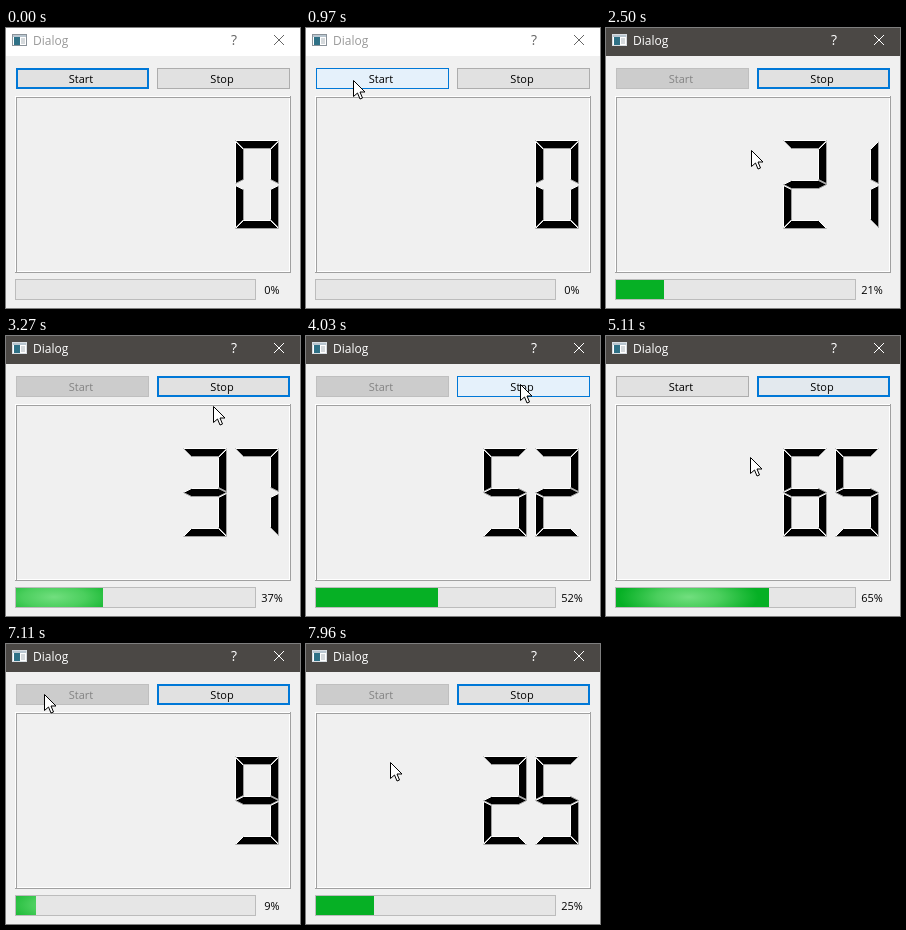
An HTML page with a canvas that plays this animation: 294x280 px, repeating every 8 s.

```html
<!DOCTYPE html>
<html lang="en">
<head>
<meta charset="utf-8">
<title>Dialog</title>
<style>
  html, body { margin: 0; width: 100%; height: 100%; overflow: hidden; background: #f0f0f0; }
  canvas { display: block; }
</style>
</head>
<body>
<canvas id="stage" width="294" height="280"></canvas>
<script>
const ctx = document.getElementById('stage').getContext('2d');
const LOOP = 8000;
const SEG = 44, THICK = 8, HALF = THICK / 2;
const LIT = ['012456', '25', '02346', '02356', '1235', '01356', '013456', '025', '0123456', '012356'];

// Each segment: origin, then corners; the last value of a corner tells if its edge is light.
const SEGMENTS = [
  [[0, 0], [SEG - 1, 0, 1], [SEG - THICK - 1, THICK, 0], [THICK, THICK, 0], [0, 0, 0]],
  [[0, 1], [THICK, THICK, 1], [THICK, SEG - HALF - 2, 0], [0, SEG - 2, 0], [0, 0, 1]],
  [[SEG - 1, 1], [0, SEG - 2, 0], [-THICK, SEG - HALF - 2, 0], [-THICK, THICK, 1], [0, 0, 1]],
  [[0, SEG], [THICK, -HALF, 1], [SEG - THICK - 1, -HALF, 1], [SEG - 1, 0, 0],
    [SEG - THICK - 1, HALF, 0], [THICK, HALF, 0], [0, 0, 0]],
  [[0, SEG + 1], [THICK, HALF, 1], [THICK, SEG - THICK - 2, 0], [0, SEG - 2, 0], [0, 0, 1]],
  [[SEG - 1, SEG + 1], [0, SEG - 2, 0], [-THICK, SEG - THICK - 2, 0], [-THICK, HALF, 1], [0, 0, 1]],
  [[0, SEG * 2], [THICK, -THICK, 1], [SEG - THICK - 1, -THICK, 1], [SEG - 1, 0, 1], [0, 0, 0]]
];

// Pointer path: tick, x, y.
const PATH = [
  [0, 150, 245], [3, 128, 180], [6, 82, 104], [9, 50, 56], [11, 44, 47], [20, 44, 47],
  [24, 62, 80], [30, 145, 122], [36, 197, 88], [40, 207, 70], [43, 213, 55], [46, 214, 48],
  [58, 214, 48], [61, 180, 88], [64, 144, 121], [68, 74, 76], [71, 46, 56], [74, 38, 51],
  [76, 38, 50], [90, 38, 50], [93, 46, 66], [97, 74, 108], [100, 84, 118]
];
const GLOW_STARTS = [1450, 2840, 4545, 6640];

function rect(x, y, w, h, color) {
  ctx.fillStyle = color;
  ctx.fillRect(x, y, w, h);
}

function frame(x, y, w, h, fill, border, line = 1) {
  rect(x, y, w, h, border);
  rect(x + line, y + line, w - 2 * line, h - 2 * line, fill);
}

function line(x1, y1, x2, y2, color, width = 1) {
  ctx.strokeStyle = color;
  ctx.lineWidth = width;
  ctx.beginPath();
  ctx.moveTo(x1, y1);
  ctx.lineTo(x2, y2);
  ctx.stroke();
}

function label(text, x, y, color, size = 11, align = 'center') {
  ctx.font = `${size}px "Open Sans", sans-serif`;
  ctx.textAlign = align;
  ctx.fillStyle = color;
  ctx.fillText(text, x, y);
}

function pointerAt(tick) {
  const next = PATH.findIndex(p => p[0] >= tick);
  if (next < 0) return PATH[PATH.length - 1].slice(1);
  if (next === 0) return PATH[0].slice(1);
  const [k0, x0, y0] = PATH[next - 1], [k1, x1, y1] = PATH[next];
  const p = (tick - k0) / (k1 - k0);
  return [Math.round(x0 + (x1 - x0) * p), Math.round(y0 + (y1 - y0) * p)];
}

function countAt(tick) {
  if (tick < 16) return 0;
  if (tick < 84) return Math.min(65, Math.floor(1.53 * (tick - 20) + 6.6));
  return Math.floor(1.5 * (tick - 90) + 9.2);
}

function drawTitle(active) {
  const ink = active ? '#ffffff' : '#666666';
  rect(0, 0, 294, 28, active ? '#4b4845' : '#ffffff');
  frame(6, 6, 15, 12, '#ffffff', active ? '#d8dde2' : '#8a9299');
  rect(7, 7, 13, 2, '#b9c6d0');
  rect(8, 9, 6, 8, '#2f7186');
  rect(15, 10, 4, 6, '#d5d9dc');
  label('Dialog', 27, 17, active ? '#ffffff' : '#999999', 12, 'left');
  label('?', 228, 17, ink, 14);
  line(268, 7, 278, 17, ink);
  line(278, 7, 268, 17, ink);
}

const STYLES = {
  normal: ['#e1e1e1', '#adadad', 1, '#000000'],
  focus: ['#e1e1e1', '#0078d7', 2, '#000000'],
  fading: ['#e3e9ee', '#0078d7', 2, '#000000'],
  hover: ['#e5f1fb', '#0078d7', 1, '#000000'],
  disabled: ['#cccccc', '#bfbfbf', 1, '#838383']
};

function drawButton(text, x, style) {
  const [fill, border, width, ink] = STYLES[style];
  frame(x, 40, 133, 21, fill, border, width);
  label(text, x + 65, 55, ink);
}

function drawSegment(x, y, [[ox, oy], ...corners]) {
  x += ox + 0.5;
  y += oy + 0.5;
  ctx.beginPath();
  ctx.moveTo(x, y);
  for (const [cx, cy] of corners) ctx.lineTo(x + cx, y + cy);
  ctx.fillStyle = '#000000';
  ctx.fill();
  let px = 0, py = 0;
  for (const [cx, cy, light] of corners) {
    line(x + px, y + py, x + cx, y + cy, light ? '#ffffff' : '#a0a0a0');
    px = cx;
    py = cy;
  }
}

function drawDisplay(count) {
  rect(9, 68, 276, 177, '#a0a0a0');
  rect(9, 68, 275, 1, '#ffffff');
  rect(9, 68, 1, 176, '#ffffff');
  rect(11, 70, 273, 174, '#ffffff');
  rect(11, 70, 272, 173, '#f0f0f0');
  const digits = String(count);
  [...digits].forEach((digit, i) => {
    const x = 229 - 52 * (digits.length - 1 - i);
    for (const s of LIT[digit]) drawSegment(x, 112, SEGMENTS[s]);
  });
}

function drawGlow(time) {
  const start = GLOW_STARTS.filter(s => s <= time).pop();
  if (start === undefined) return;
  ctx.translate(10 - 70 + (time - start) / 4, 261);
  ctx.scale(70, 24);
  const glow = ctx.createRadialGradient(0, 0, 0, 0, 0, 1);
  glow.addColorStop(0, 'rgba(165,245,170,.68)');
  glow.addColorStop(0.45, 'rgba(150,240,155,.48)');
  glow.addColorStop(1, 'rgba(140,235,145,0)');
  rect(-1, -1, 2, 2, glow);
}

function drawProgress(count, time) {
  frame(9, 251, 241, 21, '#e6e6e6', '#bcbcbc');
  const width = Math.floor(count * 2.38) - 1;
  if (width > 0) {
    ctx.save();
    ctx.beginPath();
    ctx.rect(10, 252, width, 19);
    ctx.clip();
    rect(10, 252, width, 19, '#06b025');
    drawGlow(time);
    ctx.restore();
  }
  label(count + '%', 266, 266, '#000000');
}

function drawPointer(x, y) {
  const shape = [[0, 0], [0, 16], [4, 12.5], [6.5, 18.5], [9, 17.5], [6.5, 11.5], [11.5, 11.5]];
  ctx.beginPath();
  for (const [dx, dy] of shape) ctx.lineTo(x + 0.5 + dx, y + 0.5 + dy);
  ctx.closePath();
  ctx.fillStyle = '#ffffff';
  ctx.fill();
  ctx.strokeStyle = '#000000';
  ctx.lineWidth = 1;
  ctx.stroke();
}

function startStyle(tick) {
  if (tick < 10) return 'focus';
  if (tick < 14) return 'hover';
  if (tick < 58) return 'disabled';
  if (tick < 71) return 'normal';
  return tick < 80 ? 'hover' : 'disabled';
}

function stopStyle(tick) {
  if (tick < 14) return 'normal';
  if (tick >= 43 && tick < 60) return 'hover';
  return tick >= 60 && tick < 66 ? 'fading' : 'focus';
}

function draw(time) {
  const tick = time < 200 ? -1 : Math.floor((time - 190) / 76.8);
  const shown = 200 + Math.max(0, tick) * 76.8;
  const count = countAt(tick);
  rect(0, 0, 294, 280, '#f0f0f0');
  drawTitle(tick >= 14);
  drawButton('Start', 10, startStyle(tick));
  drawButton('Stop', 151, stopStyle(tick));
  drawDisplay(count);
  drawProgress(count, shown);
  if (tick >= 0) drawPointer(...pointerAt(tick));
}

const began = performance.now();
function loop() {
  draw((performance.now() - began) % LOOP);
  requestAnimationFrame(loop);
}
loop();
</script>
</body>
</html>
```
